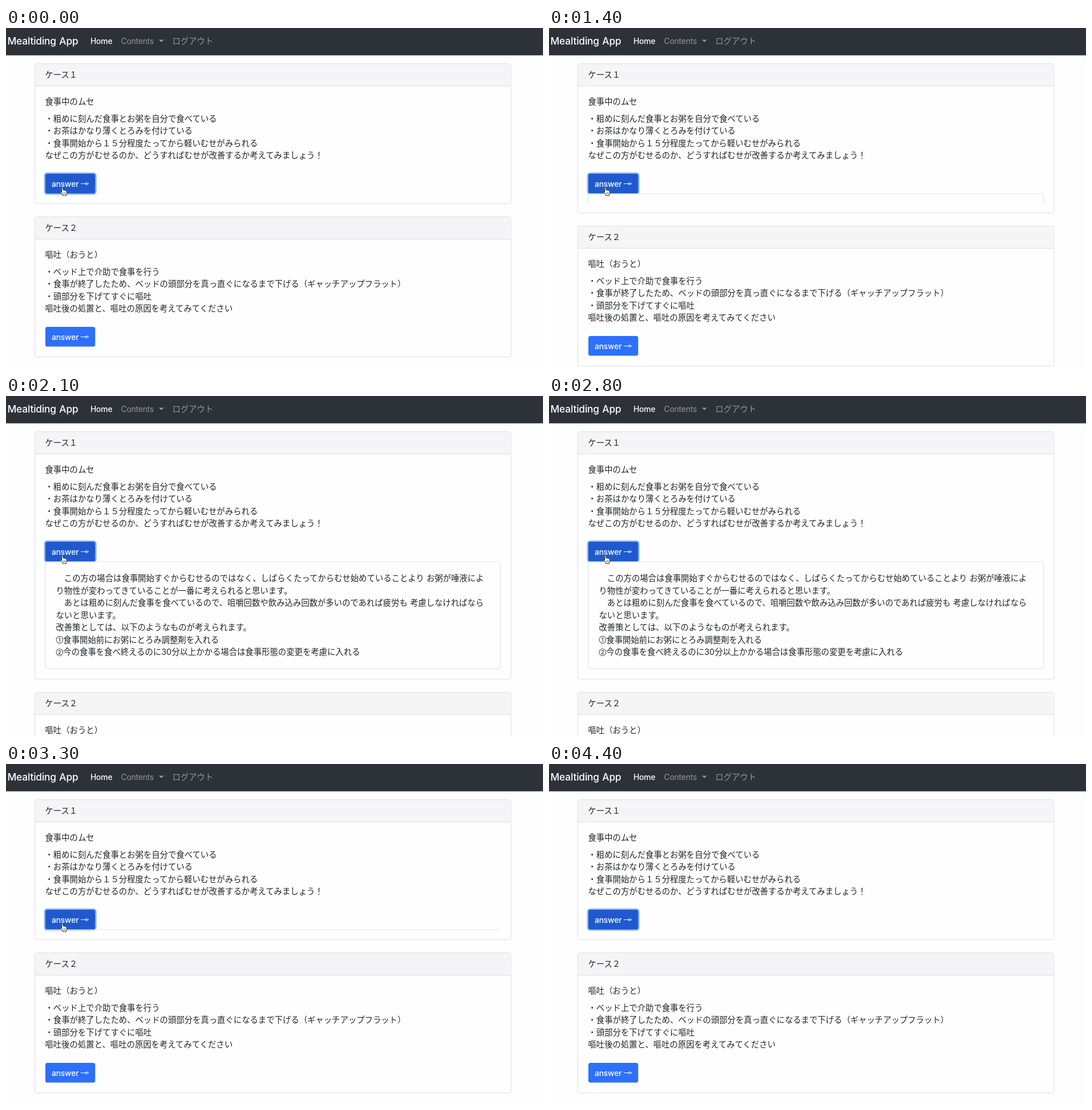
An HTML page that plays this animation: 941x595 px, repeating every 4.9 s.

```html
<!DOCTYPE html>
<html lang="ja">
<head>
<meta charset="utf-8">
<title>Mealtiding App</title>
<style>
  html, body { margin: 0; width: 100%; height: 100%; overflow: hidden; background: #fefefe; }
  svg { display: block; }
  text {
    font: 14.36px "Noto Sans CJK JP", "Noto Sans CJK", sans-serif;
    word-spacing: 1px;
    fill: #222428;
    text-spacing-trim: space-all;
  }
  .latin { font: 500 13.8px Inter, sans-serif; letter-spacing: -.15px; fill: #fff; }
  .brand { font-size: 17.3px; }
  .muted { fill: #95989c; }
  text.latin.muted { font-weight: 400; }
  .digits { font-family: Inter, sans-serif; }
  .circled { font: 500 9.2px Inter, "Noto Sans CJK JP", sans-serif; }
  .frame { fill: #fefefe; stroke: #dfdfe1; }
</style>
</head>
<body>
<svg id="stage" width="941" height="595" viewBox="0 0 941 595">
  <defs>
    <clipPath id="fold"><rect id="foldBox" x="60" y="289.5" width="815" height="0"/></clipPath>
  </defs>

  <rect width="941" height="47.8" fill="#2d3138"/>
  <text class="latin brand" x="2.5" y="28.5">Mealtiding App</text>
  <text class="latin" x="148" y="27.5">Home</text>
  <text class="latin muted" x="201.5" y="27.5">Contents</text>
  <path class="muted" d="M268 20.5h8.6l-4.3 4.3z"/>
  <text class="muted" x="291.5" y="28">ログアウト</text>

  <g id="case1"></g>
  <g id="case2"></g>

  <g clip-path="url(#fold)">
    <rect class="frame" x="69" y="290" width="797.5" height="187.5" rx="3.5"/>
    <g id="answer"></g>
  </g>

  <g id="hand" transform="translate(94.5 278.5)" stroke-linejoin="round" stroke-linecap="round">
    <path d="M3.2 9.2V1.9Q3.3.6 4.4.6T5.6 1.9V5.3Q7.2 4.6 7.9 5.7Q9.3 5.1 10 6.3Q12.2 5.9 12.2 8V10.2Q12.1 12 11 13.4V14.7H5V13.4L1 9.2Q.2 7.9 1.4 7.5Q2.2 7.4 3.2 9.2Z"
          fill="#fff" stroke="#222" stroke-width="1"/>
    <path d="M6.1 9.2v3M8 9.2v3M9.9 9.2v3" fill="none" stroke="#444" stroke-width=".7"/>
  </g>
</svg>

<script>
const LOOP = 4900, STEP = 100, CASE_GAP = 268, LINE = 21.5;
const $ = id => document.getElementById(id);

const cases = [
  ["ケース１", "食事中のムセ",
    "・粗めに刻んだ食事とお粥を自分で食べている",
    "・お茶はかなり薄くとろみを付けている",
    "・食事開始から１５分程度たってから軽いむせがみられる",
    "なぜこの方がむせるのか、どうすればむせが改善するか考えてみましょう！"],
  ["ケース２", "嘔吐（おうと）",
    "・ベッド上で介助で食事を行う",
    "・食事が終了したため、ベッドの頭部分を真っ直ぐになるまで下げる（ギャッチアップフラット）",
    "・頭部分を下げてすぐに嘔吐",
    "嘔吐後の処置と、嘔吐の原因を考えてみてください"]
];

const answer = [
  "　この方の場合は食事開始すぐからむせるのではなく、しばらくたってからむせ始めていることより お粥が唾液によ",
  "り物性が変わってきていることが一番に考えられると思います。",
  "　あとは粗めに刻んだ食事を食べているので、咀嚼回数や飲み込み回数が多いのであれば疲労も 考慮しなければなら",
  "ないと思います。",
  "改善策としては、以下のようなものが考えられます。",
  "①食事開始前にお粥にとろみ調整剤を入れる",
  "②今の食事を食べ終えるのに30分以上かかる場合は食事形態の変更を考慮に入れる"
];

// Opened height of the answer from each time on
const heights = [
  [0, 0], [1400, 16], [1500, 132], [1600, 174], [1700, 188],
  [3000, 184], [3100, 80], [3200, 22], [3300, .9], [3400, 0]
];
const HAND_GONE = 4400;

const text = (x, y, s) => `<text x="${x}" y="${y}">${s}</text>`;

function button(focused) {
  const ring = focused
    ? '<rect x="66.5" y="252.8" width="92.2" height="39" rx="5.5" fill="#8bbcf9"/>' : "";
  return `${ring}
    <rect x="69" y="255" width="87.3" height="34.6" rx="3.5" fill="${focused ? "#2059ce" : "#2c70fc"}"/>
    <text class="latin" x="80" y="277.5">answer</text>
    <path d="M131 272.5h9M140 270.6v3.8l5-1.9z" fill="none" stroke="#fff" stroke-width="1"/>`;
}

function card([head, title, ...lines], focused) {
  return `<rect class="frame body" x="50.5" y="62.5" width="834.5" height="245" rx="3.5"/>
    <path d="M51 101.5V66q0-3 3-3h827.5q3 0 3 3v35.5z" fill="#f5f5f7"/>
    <path d="M51 101.5H884.5" stroke="#dfdfe1"/>
    ${text(68.5, 87, head)}${text(68.5, 133.5, title)}
    ${lines.map((s, i) => text(68.5, 163.5 + i * LINE, s)).join("")}
    ${button(focused)}`;
}

function answerLine(s, i) {
  const y = 324.3 + i * LINE;
  const body = s.replace(/\d+/, '<tspan class="digits">$&</tspan>');
  if (!/^[①②]/.test(s)) return text(87.5, y, body);
  return `<text class="circled" x="87.5" y="${y - 1.6}">${s[0]}</text>` + text(100.3, y, body.slice(1));
}

$("case1").innerHTML = card(cases[0], true);
$("case2").innerHTML = card(cases[1], false);
$("answer").innerHTML = answer.map(answerLine).join("");
const firstFrame = $("case1").querySelector(".body");

function draw(now) {
  const t = Math.floor(now % LOOP / STEP) * STEP;
  const h = heights.filter(([from]) => from <= t).pop()[1];
  const shift = Math.floor(h);
  $("foldBox").setAttribute("height", h && h + .5);
  firstFrame.setAttribute("height", 245 + shift);
  $("case2").setAttribute("transform", `translate(0 ${CASE_GAP + shift})`);
  $("hand").style.visibility = t < HAND_GONE ? "visible" : "hidden";
}

const start = performance.now();
function tick() {
  draw(performance.now() - start);
  requestAnimationFrame(tick);
}
tick();
</script>
</body>
</html>
```
